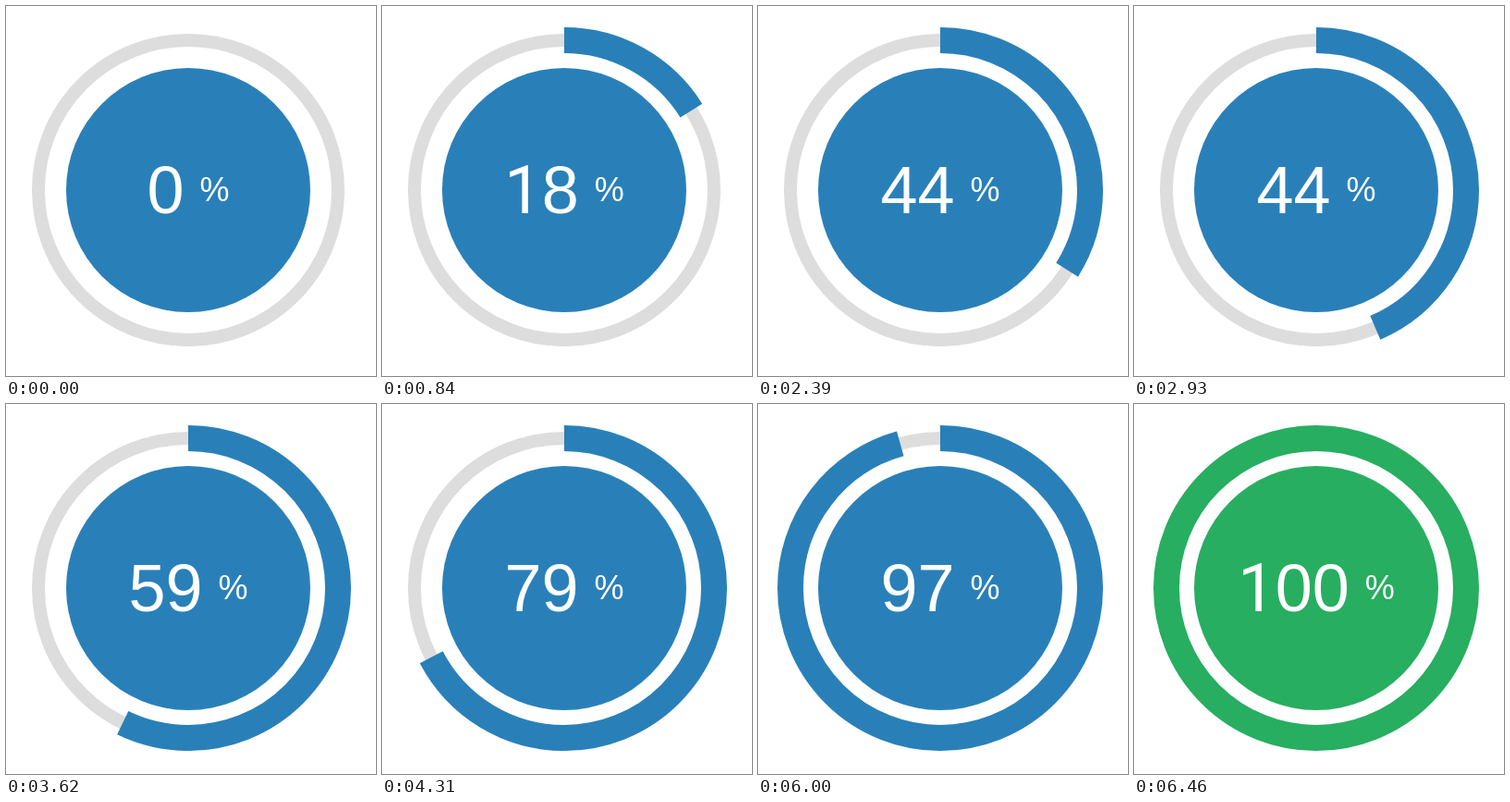
An HTML page that plays this animation: 400 by 400 pixels, repeating every 9460 ms.

```html
<!DOCTYPE html>
<html lang="en">
<head>
<meta charset="utf-8">
<title>Progress ring</title>
<style>
  html, body { margin: 0; width: 100%; height: 100%; overflow: hidden; background: #fff; }
  svg { display: block; width: 100%; height: 100%; color: #2980b9; }
  text { font: 72px "Liberation Sans", Arial, sans-serif; fill: #fff; text-anchor: middle; }
  .one { font-family: Roboto, sans-serif; }
  .unit { font-size: 36px; }
</style>
</head>
<body>
<svg id="chart" viewBox="0 0 400 400">
  <circle cx="197" cy="199" r="162" fill="none" stroke="#ddd" stroke-width="14"/>
  <circle id="arc" cx="197" cy="199" r="162" fill="none" stroke="currentColor" stroke-width="28"
    pathLength="100" transform="rotate(-90 197 199)"/>
  <circle cx="197" cy="199" r="132" fill="currentColor"/>
  <text x="197" y="224"><tspan id="num">0</tspan><tspan class="unit" dx="17" dy="-13">%</tspan></text>
</svg>
<script>
const LOOP = 9460, FPS = 13, LAST = 84;

// [step, percent] along the arc's stop-and-go progress
const path = [[0, 0], [11, 16.1], [13, 18], [16, 18.6], [23, 25.6], [26, 29.8], [28, 30.5],
  [38, 43.55], [40, 43.9], [47, 57.2], [49, 59], [52, 61.75], [65, 78.6], [68, 79.1],
  [78, 95.7], [LAST, 100]];

// [step, label]: the number jumps ahead and the arc follows
const labels = [[0, 0], [1, 18], [15, 30], [27, 44], [40, 59], [50, 79], [68, 97], [79, 100]];

const [chart, arc, num] = ['chart', 'arc', 'num'].map(id => document.getElementById(id));

const slope = i => (path[i + 1][1] - path[i][1]) / (path[i + 1][0] - path[i][0]);

// Harmonic mean of the neighbouring slopes keeps the curve monotone
function tangent(i) {
  if (i === 0) return slope(0);
  if (i === path.length - 1) return 0;
  const a = slope(i - 1), b = slope(i);
  return 2 * a * b / (a + b);
}

function percent(step) {
  if (step >= LAST) return 100;
  const i = path.findIndex(p => p[0] > step) - 1;
  const [x0, y0] = path[i], [x1, y1] = path[i + 1];
  const w = x1 - x0, u = (step - x0) / w, v = 1 - u;
  return y0 * (1 + 2 * u) * v * v + y1 * (3 - 2 * u) * u * u
    + w * u * v * (tangent(i) * v - tangent(i + 1) * u);
}

const start = performance.now();

function draw() {
  const t = (performance.now() - start) % LOOP;
  const step = Math.min(LAST, Math.floor((t + 10) * FPS / 1000));
  const label = labels.filter(l => l[0] <= step).pop()[1];
  arc.setAttribute('stroke-dasharray', percent(step) + ' 200');
  num.innerHTML = String(label).replace('1', '<tspan class="one">1</tspan>');
  chart.style.color = step === LAST ? '#27ae60' : '#2980b9';
  requestAnimationFrame(draw);
}
draw();
</script>
</body>
</html>
```
